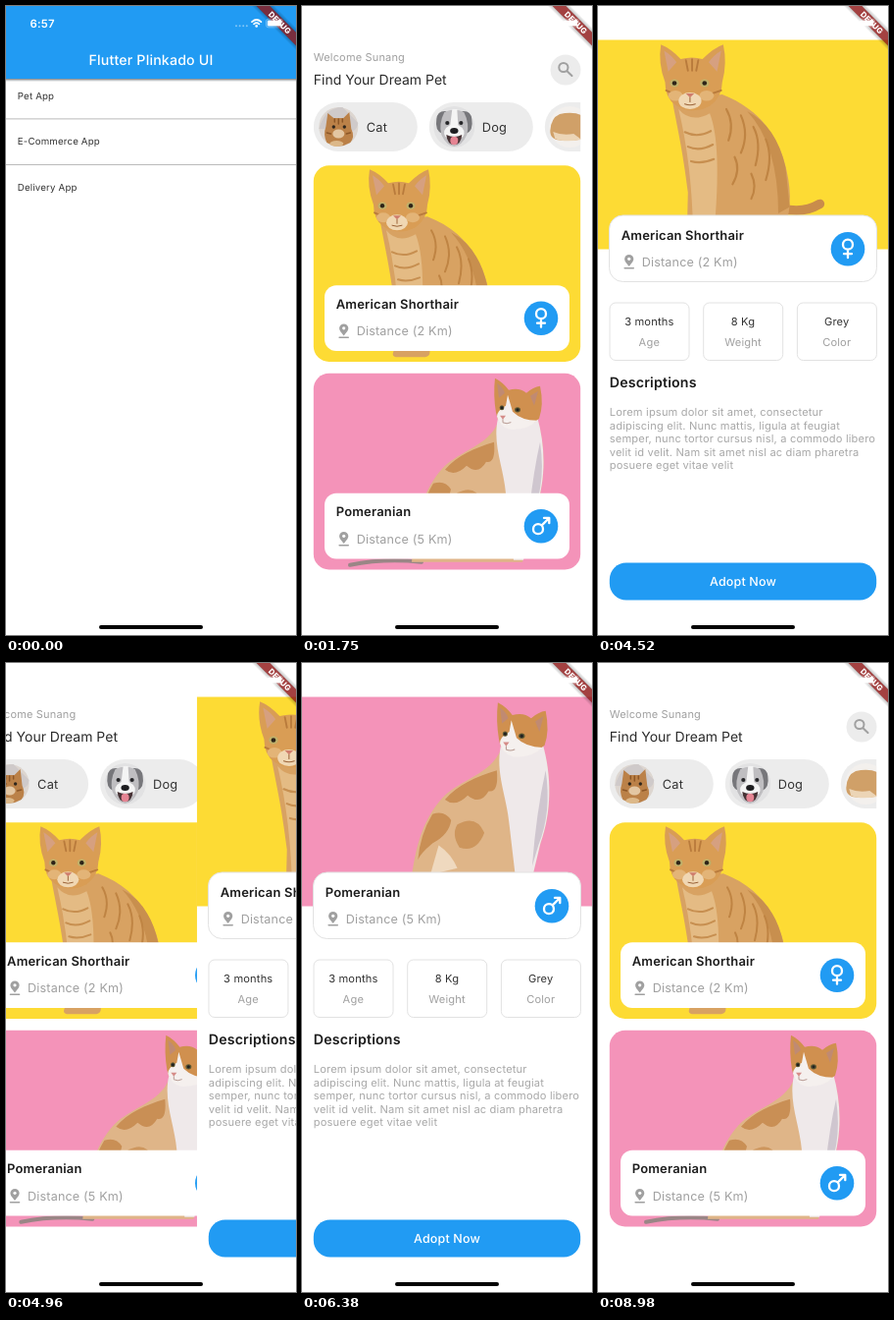
These frames come from a looping animation (296 by 640 pixels, 9.04 s). An HTML page:

```html
<!DOCTYPE html>
<html lang="en">
<head>
<meta charset="utf-8">
<style>
  html, body { margin: 0; width: 100%; height: 100%; overflow: hidden; background: #fff; }
  svg { display: block; }
  text { font-family: Inter, Roboto, sans-serif; letter-spacing: .17px; text-rendering: geometricPrecision; }
  .line { fill: none; stroke-linecap: round; stroke-linejoin: round; }
</style>
</head>
<body>
<svg id="stage" width="296" height="640" viewBox="0 0 296 640"></svg>
<script>
const W = 296, LOOP = 9040, STEP = 110;
const BLUE = '#219bf3', GREY = '#a0a0a0', INK = '#333', BLACK = '#1c1c1c', PALE = '#ececec';

const text = (x, y, str, size, fill, attrs = '') =>
  `<text x="${x}" y="${y}" font-size="${size}" fill="${fill}" ${attrs}>${str}</text>`;
const box = (x, y, w, h, r, fill, attrs = '') =>
  `<rect x="${x}" y="${y}" width="${w}" height="${h}" rx="${r}" fill="${fill}" ${attrs}/>`;
const dot = (x, y, r, fill) => `<circle cx="${x}" cy="${y}" r="${r}" fill="${fill}"/>`;
const oval = (x, y, rx, ry, fill) => `<ellipse cx="${x}" cy="${y}" rx="${rx}" ry="${ry}" fill="${fill}"/>`;
const shape = (d, fill) => `<path d="${d}" fill="${fill}"/>`;
const line = (d, color, width) => `<path class="line" d="${d}" stroke="${color}" stroke-width="${width}"/>`;
const group = (transform, ...parts) => `<g transform="${transform}">${parts.join('')}</g>`;
const BOLD = 'font-weight="600"', MID = 'text-anchor="middle"', BORDER = 'stroke="#e2e2e2"';

// Pet pictures, x in stage units and y measured from the top of the photo
const gingerCat =
  line('M185 161Q205 167 222 157', '#c98c4b', 9) +
  shape('M80 58C84 80 90 105 95 146L94 188Q90 195 98 195H126Q132 194 130 186L142 184H186Q198 160 190 125C184 95 165 66 128 52Z', '#d8a262') +
  shape('M86 66Q98 80 116 70Q128 100 120 186H100Q99 120 86 66Z', '#e4bb84') +
  shape('M152 68Q180 82 189 122L193 160L182 166Q182 100 152 68Z', '#c88f4e') +
  line('M132 66Q140 80 134 96M146 72Q154 90 146 108M158 83Q166 98 160 120M170 95Q177 112 170 134M140 112Q146 124 138 138M156 128Q162 140 156 152', '#bf8443', 2) +
  line('M92 88Q104 94 117 87M95 102Q106 107 119 100M98 116Q108 119 120 114', '#c78f50', 2) +
  shape('M69 4Q79 8 88 18Q99 15 109 18Q120 7 129 4Q133 22 128 40Q128 54 116 63Q99 72 83 62Q73 55 73 40Q66 22 69 4Z', '#d99d55') +
  shape('M72 10Q79 14 84 21L76 30ZM127 10Q120 14 115 21L123 30Z', '#d6a080') +
  line('M99 18V29M93 19L95 29M105 19L103 29M74 48L81 51M127 48L118 51', '#b97b3c', 1.8) +
  oval(83, 53, 7, 5, '#e3b477') + oval(113, 53, 7, 5, '#e3b477') +
  oval(97, 58, 11, 8, '#f0d7b3') +
  oval(82, 41, 4.4, 3.8, '#c0b06a') + oval(111, 41, 4.4, 3.8, '#c0b06a') +
  dot(82, 41, 2.2, '#2d2418') + dot(111, 41, 2.2, '#2d2418') +
  shape('M93 51H101L97 55Z', '#cf7d6c') + line('M97 55V59M92 61Q97 63 102 61', '#9b6338', 1);

const whiteCat =
  line('M49 195Q84 188 122 192', '#9a8686', 4) +
  shape('M200 50C190 74 162 78 144 96C124 118 116 145 112 192H225L238 140C249 110 249 75 240 46Z', '#dfb588') +
  shape('M196 70C176 76 158 84 146 98Q156 106 168 94Q180 104 188 90Q198 92 196 70ZM134 112Q146 108 152 118Q150 132 134 140Q122 150 120 156Q122 132 134 112Z', '#c98f55') +
  shape('M158 122Q176 112 184 130Q176 150 160 144Q152 132 158 122Z', '#cd965d') +
  shape('M140 142Q152 150 158 164L132 170Z', '#efd9bf') +
  shape('M200 46C194 72 206 96 208 122L216 190H226L238 140C249 110 249 75 240 44Z', '#efe9ea') +
  shape('M243 70Q249 110 236 142L230 162Q234 110 243 70Z', '#cfc6cf') +
  shape('M197 5Q205 9 211 17Q222 14 229 20Q236 14 243 13Q247 32 242 46Q230 57 212 56Q200 53 198 40Q195 22 197 5Z', '#d0904f') +
  shape('M199 10Q205 14 207 20L201 25ZM241 18L233 23L237 33Z', '#c08a72') +
  shape('M210 22L208 33Q199 38 199 44Q201 54 212 57Q230 58 240 48Q224 48 215 39Z', '#f5f0ee') +
  oval(204, 35, 2.4, 2.5, '#5f5a33') + oval(220, 37, 3, 2.6, '#5f5a33') +
  dot(204, 35, 1.5, '#222') + dot(220, 37, 1.6, '#222') +
  shape('M202 43H208L205 47Z', '#d58c88') + line('M205 47V50Q209 52 213 50', '#b79a92', 1);

const catFace =
  dot(0, 0, 20, '#ddd6d0') + shape('M-20 2Q-14 -20 4 -20L20 -4Q18 8 8 2Z', '#cfcaca') +
  shape('M-11 -14L-5 -9H5L11 -15L13 2Q17 10 12 16Q0 23 -12 16Q-16 8 -13 0Z', '#bb8148') +
  oval(0, 7, 6, 4.5, '#e3c6a2') + oval(-2, 17, 7, 3, '#dcb889') +
  dot(-5, 0, 1.7, '#2f261c') + dot(6, 0, 1.7, '#2f261c') +
  line('M0 -8V-3M-4 -8V-5M4 -8V-5M-12 6L-8 7M12 6L8 7', '#8d5727', 1.5);
const dogFace =
  dot(0, 0, 21, '#e2e2e3') + shape('M-18 -8Q-17 -17 -8 -16L-12 7Q-20 4 -18 -8ZM18 -8Q17 -17 8 -16L12 7Q20 4 18 -8Z', '#77777b') +
  shape('M-10 -15Q0 -20 10 -15Q16 -3 13 8Q8 19 0 20Q-8 19 -13 8Q-16 -3 -10 -15Z', '#bfbec1') +
  shape('M-2 -18H3L4 -2Q13 3 9 10Q0 15 -9 10Q-13 3 -4 -2Z', '#f4f4f4') +
  dot(-7, -4, 2.1, '#252528') + dot(7, -4, 2.1, '#252528') + oval(0, 4, 4.2, 3, '#1d1d20') +
  shape('M-8 8Q0 12 8 8Q7 18 0 18Q-7 18 -8 8Z', '#473235') + oval(0, 14, 4, 4.2, '#e58493');
const hamster =
  dot(0, 0, 21, '#f3f0ed') + shape('M-20 4Q-19 -13 -5 -14Q14 -16 20 -4V10Q4 16 -14 13Q-20 11 -20 4Z', '#d0a068') +
  shape('M-17 5Q-8 9 4 7L12 13Q-6 16 -15 12Z', '#ecd5b6');

const female = line('M5 -4.5A5 5 0 1 1 -5 -4.5A5 5 0 1 1 5 -4.5M0 .5V9M-4 5H4', '#fff', 2.3);
const male = line('M2 3A5 5 0 1 1 -8 3A5 5 0 1 1 2 3M.8 -.8L8 -8M3 -8.3H8.3V-3', '#fff', 2.3);

const pets = [
  { name: 'American Shorthair', km: 2, color: '#fddb34', art: gingerCat, sex: female },
  { name: 'Pomeranian', km: 5, color: '#f493b9', art: whiteCat, sex: male },
];

const pin = shape('M0 4.5C-3.4 .4 -4.6 -1 -4.6 -3.2A4.6 4.4 0 0 1 4.6 -3.2C4.6 -1 3.4 .4 0 4.5Z', GREY) +
  dot(0, -3.2, 1.6, '#fff') + line('M-4.6 6.3H4.6', GREY, 1.4);

const info = (pet, x, y, sexX) =>
  text(x, y, pet.name, 13, BLACK, BOLD) +
  group(`translate(${x + 8} ${y + 23})`, pin) +
  text(x + 21, y + 27.5, `Distance (${pet.km} Km)`, 12.6, GREY) +
  group(`translate(${sexX} ${y + 9.7})`, dot(0, 0, 17.3, BLUE), pet.sex);

const home =
  box(0, 0, W, 640, 0, '#fff') +
  [76, 75, 74].map((h, i) => box(0, 0, W, h + 1, 0, `rgba(0,0,0,${.08 + i * .08})`)).join('') +
  box(0, 0, W, 74, 0, BLUE) +
  text(148, 59.5, 'Flutter Plinkado UI', 14.2, '#fff', MID + ' font-weight="500"') +
  ['Pet App', 'E-Commerce App', 'Delivery App'].map((s, i) => text(11.8, 95 + i * 46.4, s, 9.7, INK)).join('') +
  box(0, 114.5, W, .8, 0, '#aaa') + box(0, 161, W, .8, 0, '#aaa');

const chip = (i, art, label) => group(`translate(${i * 118} 0)`,
  box(0, 0, 106, 50, 25, PALE), group('translate(25.5 25)', art), text(54, 30, label, 12.8, INK));

const card = (pet, i) => group(`translate(0 ${162.3 + i * 211.5})`,
  box(11.8, 0, 272.4, 199.7, 15.8, pet.color), pet.art,
  box(23, 122, 250, 66.7, 12, '#fff'), info(pet, 34.7, 145.7, 244));

const list =
  box(0, 0, W, 640, 0, '#fff') +
  text(11.8, 56, 'Welcome Sunang', 11, GREY) +
  text(11.8, 80, 'Find Your Dream Pet', 14, '#2a2a2a', 'style="letter-spacing:0"') +
  dot(269, 65, 15.5, PALE) + line('M271.5 62.5A4.6 4.6 0 1 1 262.3 62.5A4.6 4.6 0 1 1 271.5 62.5M270.5 66.2L275.5 71', GREY, 2) +
  `<svg x="11.8" y="98" width="272.4" height="50">${chip(0, catFace, 'Cat') + chip(1, dogFace, 'Dog') + chip(2, hamster, '')}</svg>` +
  pets.map(card).join('');

const stat = ([value, label], i) =>
  box(12 + i * 95.7, 302, 81, 58.5, 6, '#fff', BORDER) +
  text(52.3 + i * 95.7, 325, value, 11.1, INK, MID) +
  text(52.3 + i * 95.7, 345.5, label, 11.1, GREY, MID);

const lorem = [
  'Lorem ipsum dolor sit amet, consectetur',
  'adipiscing elit. Nunc mattis, ligula at feugiat',
  'semper, nunc tortor cursus nisl, a commodo libero',
  'velit id velit. Nam sit amet nisl ac diam pharetra',
  'posuere eget vitae velit',
];

const detail = pet =>
  box(0, 0, W, 640, 0, '#fff') + box(0, 34.5, W, 213, 0, pet.color) +
  group('translate(-8.9 35) scale(1.06)', pet.art) +
  box(11.5, 213, 273, 67.5, 14, '#fff', BORDER) + info(pet, 23.7, 237.5, 255) +
  [['3 months', 'Age'], ['8 Kg', 'Weight'], ['Grey', 'Color']].map(stat).join('') +
  text(11.8, 388, 'Descriptions', 14.2, BLACK, BOLD) +
  lorem.map((s, i) => text(11.8, 417 + i * 13.6, s, 11.1, '#a8a8a8')).join('') +
  box(11.8, 566.5, 272.4, 38, 17, BLUE) +
  text(148, 590, 'Adopt Now', 12.5, '#fff', MID + ' font-weight="500"');

const overlay =
  group('translate(279.5 17) rotate(45)',
    [8, 6.8, 5.8].map(h => box(-40, -h, 80, h * 2, 0, 'rgba(0,0,0,.08)')).join(''),
    box(-40, -4.8, 80, 9.6, 0, 'rgba(0,0,0,.36)'), box(-40, -4.8, 80, 9.6, 0, '#b71c1ca0'),
    text(0, 2.9, 'DEBUG', 8, '#fff', MID + ' font-weight="800"')) +
  text(24.5, 22, '6:57', 11.4, '#fff', BOLD) +
  [235, 238.6, 242.2, 245.8].map(x => dot(x, 20.3, 1, '#ffffff70')).join('') +
  line('M251 16.2Q255.7 11.8 260.4 16.2M253 18.3Q255.7 16 258.4 18.3', '#fff', 1.7) + dot(255.7, 20.4, 1.3, '#fff') +
  box(265.5, 13.2, 17, 8.6, 2.4, 'none', 'stroke="#ffffff70" stroke-width=".8"') + box(266.8, 14.5, 14.4, 6, 1.3, '#fff') +
  box(95, 630, 106, 4, 2, '#000');

const stage = document.getElementById('stage');
stage.innerHTML = [home, list, pets.map(p => `<g>${detail(p)}</g>`).join('')]
  .map(page => `<g class="page">${page}</g>`).join('') + overlay;
const pages = [...stage.querySelectorAll('.page')];
const details = [...pages[2].children];

// Navigation moves: start, duration, direction (1 pushes a page, -1 swipes it away)
const moves = [[1420, 330, 1], [2710, 330, 1], [4520, 660, -1], [6040, 330, 1], [8650, 330, -1]];
const easePush = p => 1 - (1 - p) ** 2.81;
const easeSwipe = p => p ** 1.03;

function depthAt(t) {
  return moves.reduce((depth, [start, length, dir]) => {
    const held = Math.floor((t - start + .01) / STEP) * STEP;
    const p = Math.min(1, Math.max(0, held / length));
    return depth + dir * (dir > 0 ? easePush : easeSwipe)(p);
  }, 0);
}

function draw() {
  const t = performance.now() % LOOP, depth = depthAt(t);
  pages.forEach((page, i) => {
    const ahead = i - depth;
    const x = W * (ahead > 0 ? Math.min(1, ahead) : ahead / 3);
    page.setAttribute('transform', `translate(${x.toFixed(2)} 0)`);
  });
  details.forEach((d, i) => d.style.display = (t > 5600) == i ? '' : 'none');
  requestAnimationFrame(draw);
}
draw();
</script>
</body>
</html>
```
